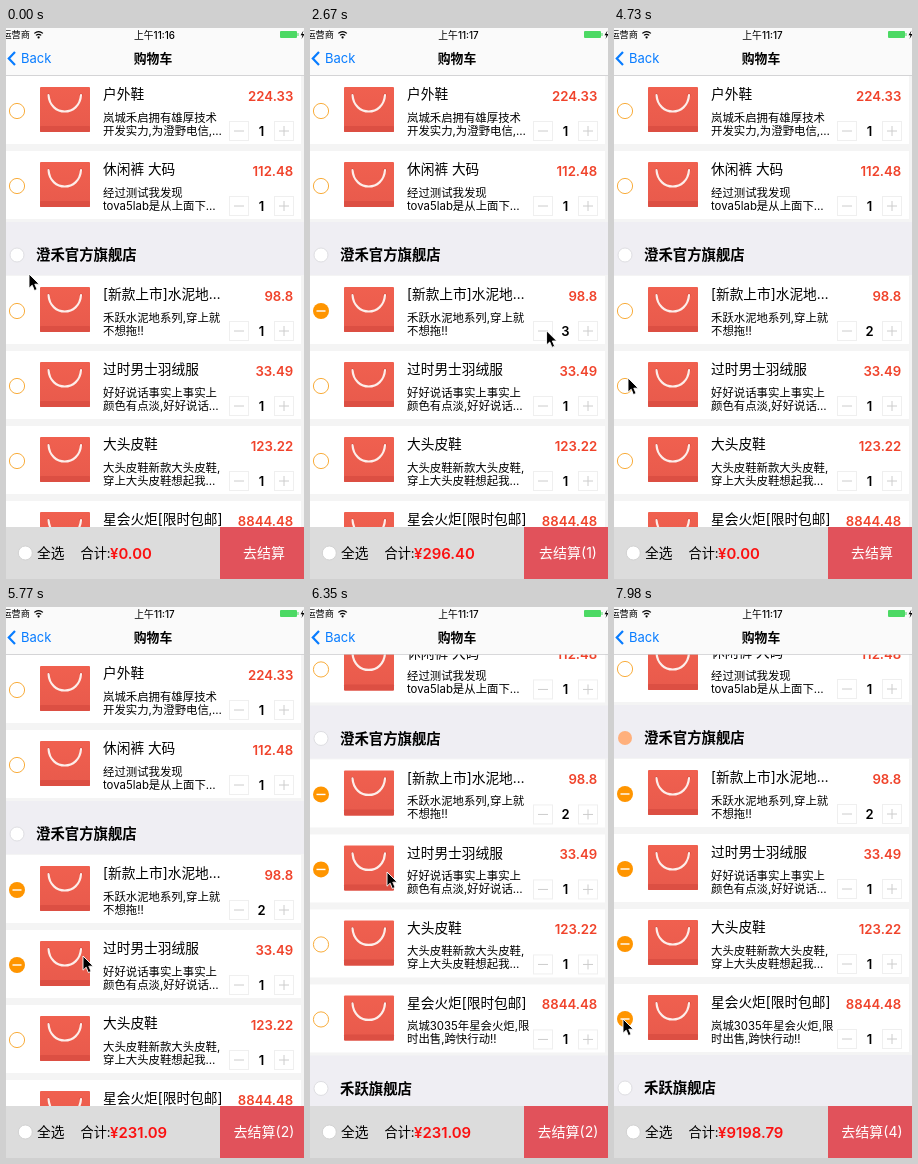
An HTML page for the animation above (8000 ms loop, 298 px wide and 551 px high).

```html
<!DOCTYPE html>
<html lang="zh-CN">
<head>
<meta charset="utf-8">
<style>
html, body { margin: 0; width: 100%; height: 100%; overflow: hidden; background: #f4f4f4; }
svg { display: block; font-family: Inter, "Noto Sans CJK SC", "Noto Sans CJK", sans-serif; }
text { white-space: pre; }
</style>
</head>
<body>
<svg id="stage" width="298" height="551" viewBox="0 0 298 551"></svg>
<script>
const LOOP = 8000, STEP = 147.7; // ms; the picture advances in whole steps
const stage = document.getElementById('stage');

const goods = [
  ['户外鞋', 224.33, '岚城禾启拥有雄厚技术', '开发实力,为澄野电信,…'],
  ['休闲裤 大码', 112.48, '经过测试我发现', 'tova5lab是从上面下…'],
  ['[新款上市]水泥地…', 98.8, '禾跃水泥地系列,穿上就', '不想拖!!'],
  ['过时男士羽绒服', 33.49, '好好说话事实上事实上', '颜色有点淡,好好说话…'],
  ['大头皮鞋', 123.22, '大头皮鞋新款大头皮鞋,', '穿上大头皮鞋想起我…'],
  ['星会火炬[限时包邮]', 8844.48, '岚城3035年星会火炬,限', '时出售,跨快行动!!']
];
const SECOND_SHOP = 2;
const rowTop = i => 48 + 75 * i + (i < SECOND_SHOP ? 0 : 50);

// The session, told in steps: the pointer moves, waits and taps.
const moves = [], taps = [];
let clock = 0;
const wait = n => { clock += n; };
const move = (n, x, y) => { moves.push({ start: clock, n, x, y }); clock += n; };
const select = item => taps.push({ when: clock, item, change: 0 });
const add = (item, change) => taps.push({ when: clock, item, change });

move(3, 11, 281); wait(1); select(2);
wait(2); move(5, 281, 301); wait(1); add(2, 1);
wait(4); add(2, 1);
move(3, 231, 303); wait(1); add(2, -1);
move(6.8, 12, 282); wait(1.2); select(2);
move(4, 14, 350); wait(2); select(3);
move(2, 12, 281); select(2);
move(3, 77, 349);
const dragStart = clock + .88;
move(4, 77, 265);
wait(1); move(3, 12, 336); wait(1); select(4);
wait(1); move(4, 9, 412); wait(1); select(5);

const clamp = u => Math.min(1, Math.max(0, u));
const easeOut = u => 1 - (1 - u) ** 2;
const smooth = u => u * u * (3 - 2 * u);
const scrollAt = k => 96 * smooth(clamp((k - dragStart) / 3.25));

function pointerAt(k) {
  let x = 23, y = 246;
  for (const m of moves) {
    const e = easeOut(clamp((k - m.start) / m.n));
    x += (m.x - x) * e;
    y += (m.y - y) * e;
  }
  return `${x} ${y}`;
}

const rect = (x, y, w, h, fill, more = '') =>
  `<rect x="${x}" y="${y}" width="${w}" height="${h}" fill="${fill}" ${more}/>`;
const line = (d, color, width, more = '') =>
  `<path d="${d}" fill="none" stroke="${color}" stroke-width="${width}" ${more}/>`;
const dot = (x, y, r, fill, stroke = 'none') =>
  `<circle cx="${x}" cy="${y}" r="${r}" fill="${fill}" stroke="${stroke}"/>`;
// y is the middle of the glyphs
const text = (x, y, size, str, fill = '#000', more = '') =>
  `<text x="${x}" y="${y + size * .37}" font-size="${size}" fill="${fill}" ${more}>${str}</text>`;
const MID = 'text-anchor="middle"', END = 'text-anchor="end"', BOLD = ' font-weight="600"';

const bag = rect(34, 11, 50, 45, 'url(#bag)', 'rx="1"') +
  rect(34, 50, 50, 6, '#dc4f43', 'rx="1"') +
  dot(42.5, 19, 1.6, '#c9443a') + dot(75, 19, 1.6, '#c9443a') +
  line('M42.5 19C44 41 73.5 41 75 19', '#fdeeea', 2.2, 'stroke-linecap="round"');

function stepper(y, count) {
  const box = x => rect(x, y - 9.5, 19, 19, '#fff', 'stroke="#efefef"');
  return box(223.5) + box(268.5) +
    line(`M228 ${y}h10M273 ${y}h10M278 ${y - 5}v10`, '#ccc', 1) +
    text(255.5, y, 13, count, '#000', MID + BOLD);
}

const check = on => on
  ? dot(11, 35, 8, '#ff9500') + line('M6.5 35h9', '#fff', 1.4)
  : dot(11, 35, 7.6, '#fff', '#f9ad3c');

function row([title, price, first, second], i, on, count) {
  return `<g transform="translate(0 ${rowTop(i)})">` +
    rect(0, 0, 295, 68, '#fff') + check(on) + bag +
    text(97, 18.3, 13.7, title) +
    text(97, 41.8, 11.4, first) + text(97, 54.8, 11.4, second) +
    text(287.3, 20, 13.2, price, '#f0432b', END + BOLD) +
    stepper(55, count) + '</g>';
}

function header(y, name, on) {
  return rect(0, y - 33, 298, 53, '#efeef3') +
    dot(11, y, 7, on ? '#ffb07c' : '#fff', on ? 'none' : '#dedee2') +
    text(30, y, 14.4, name, '#000', BOLD);
}

function navBar(k) {
  return rect(0, 0, 298, 47, '#fafafa') + rect(0, 47, 298, .7, '#c8c8ca') +
    text(24, 7, 9.2, '运营商', '#000', END) +
    line('M28.3 5.4q4.3-3.6 8.6 0M30 7.4q2.6-2.2 5.2 0', '#000', 1.2) +
    dot(32.6, 9.4, 1.1, '#000') +
    text(148.5, 7, 9.8, '上午11:1' + (k < 18 ? 6 : 7), '#000', MID + ' font-weight="500"') +
    rect(274, 3, 17, 7, '#4cd964', 'rx="1"') + rect(291.5, 5, 1, 3, '#4cd964') +
    '<path d="M297.5 2.5l-3 4.8h2l-1 3.6 3-4.8h-2z"/>' +
    line('M9 24L2.8 30.5L9 37', '#087cff', 2.2) +
    text(15, 30.5, 13, 'Back', '#087cff') +
    text(147, 30.5, 12.8, '购物车', '#000', MID + BOLD);
}

function footer(total, picked) {
  return rect(0, 499, 214, 52, '#dcdcdc') + rect(214, 499, 84, 52, '#e1525b') +
    dot(19.3, 525, 7, '#fff', '#d2d2d2') +
    text(31, 525, 13.7, '全选') + text(74.5, 525, 13.2, '合计:') +
    text(104, 525, 14.9, '¥' + total.toFixed(2), '#fb1010', BOLD) +
    text(258, 525, 14, '去结算' + (picked ? `(${picked})` : ''), '#fff', MID);
}

function draw(k) {
  const on = goods.map(() => false), count = goods.map(() => 1);
  for (const { when, item, change } of taps) {
    if (when > k + .01) break;
    if (change) count[item] += change;
    else on[item] = !on[item];
  }
  const total = goods.reduce((sum, g, i) => sum + on[i] * count[i] * g[1], 0);
  const list = header(227, '澄禾官方旗舰店', on.slice(SECOND_SHOP).every(Boolean)) +
    header(577, '禾跃旗舰店', false) +
    goods.map((g, i) => row(g, i, on[i], count[i])).join('');

  stage.innerHTML =
    `<defs><linearGradient id="bag" x2="0" y2="1">
      <stop stop-color="#f0604f"/><stop offset="1" stop-color="#e85a4c"/></linearGradient></defs>` +
    rect(0, 0, 298, 551, '#f4f4f4') +
    `<g transform="translate(0 ${-scrollAt(k)})">${list}</g>` +
    navBar(k) + footer(total, on.filter(Boolean).length) +
    `<path transform="translate(${pointerAt(k)})" stroke="#fff" stroke-width=".9"
      d="M0 0V14.2L3.2 11.2L5.4 16.6L8.1 15.4L5.8 10.2H10.2Z"/>`;
}

let shown = -1;
function tick(now) {
  const k = Math.floor((now % LOOP + 4) / STEP);
  if (k !== shown) draw(shown = k);
  requestAnimationFrame(tick);
}
tick(performance.now());
</script>
</body>
</html>
```
